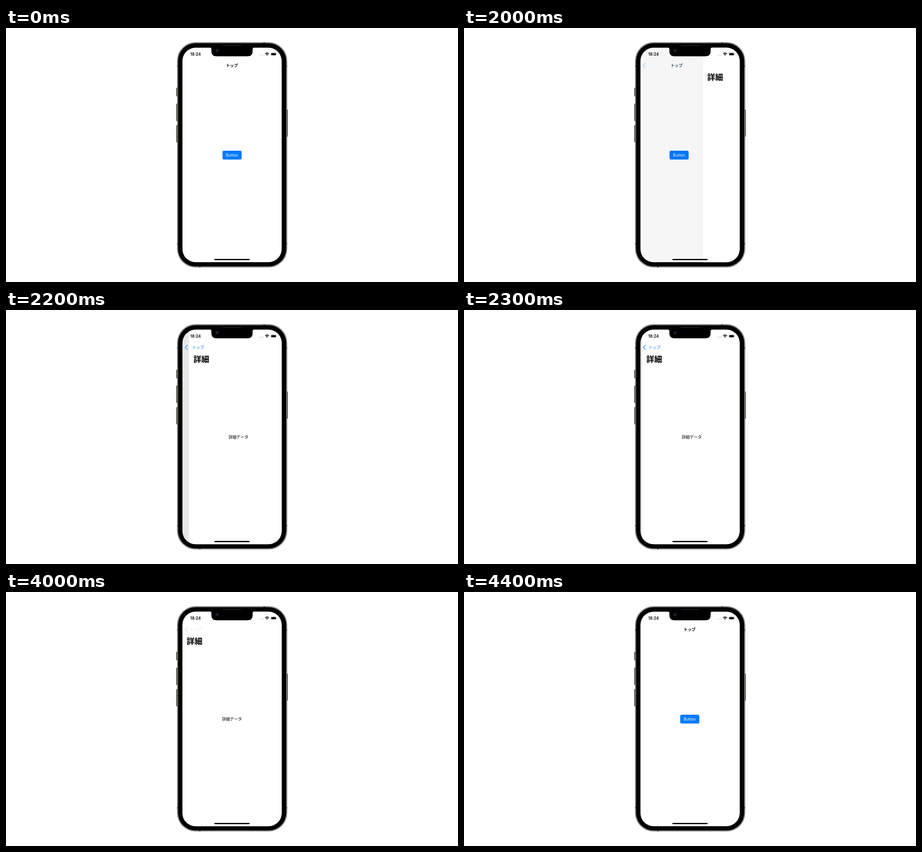
An HTML page for the animation above (5000 ms loop, 998 by 561 pixels).

```html
<!DOCTYPE html>
<html lang="ja">
<head>
<meta charset="utf-8">
<title>Push transition</title>
<style>
  html, body { margin: 0; width: 100%; height: 100%; overflow: hidden; background: #fff; }
  svg { display: block; width: 100vw; height: 100vh; }
  .jp { font-family: "Noto Sans CJK JP", "Noto Sans CJK", sans-serif; font-size: 8.8px; }
  .en { font-family: Inter, "Noto Sans", sans-serif; font-size: 8.8px; }
  .bold { font-weight: 700; }
  .semi { font-weight: 600; }
</style>
</head>
<body>
<svg viewBox="0 0 998 561">
  <defs>
    <clipPath id="screen"><rect x="389.6" y="43.5" width="219" height="473.8" rx="29"/></clipPath>
  </defs>

  <!-- side buttons -->
  <g fill="#45463f">
    <rect x="376" y="132" width="3" height="19" rx="1"/>
    <rect x="376" y="167" width="3" height="38.5" rx="1"/>
    <rect x="376" y="214.5" width="3" height="38" rx="1"/>
    <rect x="619.5" y="180" width="2.7" height="60" rx="1"/>
  </g>

  <!-- case and bezel -->
  <rect x="377.8" y="31.5" width="243" height="497.3" rx="41" fill="#55564f"/>
  <rect x="378.7" y="32.4" width="241.2" height="495.5" rx="40" fill="#c4c5bb"/>
  <rect x="379.5" y="33.2" width="239.6" height="493.9" rx="39.3" fill="#30312c"/>
  <rect x="380.2" y="33.9" width="238.2" height="492.5" rx="38.6"/>
  <g fill="#3c3d38">
    <rect x="377.8" y="82.5" width="2.4" height="3"/>
    <rect x="618.4" y="82.5" width="2.4" height="3"/>
    <rect x="377.8" y="475" width="2.4" height="3"/>
    <rect x="618.4" y="475" width="2.4" height="3"/>
    <rect x="568.5" y="31.5" width="3" height="2.4"/>
    <rect x="426.5" y="526.4" width="3" height="2.4"/>
  </g>

  <g clip-path="url(#screen)">
    <rect x="389" y="43" width="221" height="475" fill="#fff"/>
    <g id="topPage">
      <rect id="button" x="478" y="271" width="42.2" height="19.4" rx="3.4"/>
      <text id="buttonText" class="en" x="499.1" y="284" text-anchor="middle">Button</text>
    </g>
    <rect id="dim" x="389" y="43" width="221" height="475"/>
    <g id="detailPage">
      <rect x="389.6" y="43" width="221" height="475" fill="#fff"/>
      <text class="jp" x="499" y="284.3" text-anchor="middle">詳細データ</text>
    </g>
    <text id="largeTitle" class="jp bold" x="398.7" y="114.8" style="font-size:17.5px">詳細</text>
    <g id="back">
      <path id="chevron" d="M400.6 77.6 L395.6 82.6 L400.6 87.6" fill="none" stroke-width="1.3"
            stroke-linecap="round" stroke-linejoin="round"/>
      <text id="backText" class="jp" x="406" y="85.9">トップ</text>
    </g>
    <text id="topTitle" class="jp bold" x="485.8" y="85.9">トップ</text>

    <!-- status bar -->
    <text class="en semi" x="406.8" y="60.9">18:24</text>
    <g fill="#a5a5a5">
      <circle cx="560.3" cy="60" r=".7"/><circle cx="562.9" cy="60" r=".7"/>
      <circle cx="565.5" cy="60" r=".7"/><circle cx="568.1" cy="60" r=".7"/>
    </g>
    <g fill="none" stroke="#000" stroke-width="1.4">
      <path d="M572.2 56.8 A5.8 5.8 0 0 1 580.6 56.8"/>
      <path d="M573.8 58.5 A3.6 3.6 0 0 1 579 58.5"/>
    </g>
    <path d="M576.4 61.2 L574.9 59.7 A2.2 2.2 0 0 1 577.9 59.7 Z"/>
    <rect x="584.9" y="54.7" width="11.6" height="6" rx="1.7" fill="none" stroke="#999" stroke-width=".6"/>
    <rect x="585.6" y="55.4" width="10.2" height="4.6" rx="1"/>
    <rect x="597.1" y="56.7" width=".8" height="2" rx=".4" fill="#999"/>

    <rect x="460" y="509.9" width="78" height="2.8" rx="1.4"/>
  </g>

  <!-- notch, speaker and camera -->
  <path d="M450.5 43 Q453.5 43.5 453.5 46.5 V51 Q453.5 62.5 465 62.5 H533 Q544.5 62.5 544.5 51 V46.5 Q544.5 43.5 547.5 43 Z"/>
  <rect x="479" y="37.2" width="40" height="2.4" rx="1.2" fill="#1c1c1c"/>
  <circle cx="466.2" cy="50" r="4" fill="#10131a"/>
  <circle cx="466.2" cy="50" r="1.7" fill="#1d2940"/>
  <circle cx="466.6" cy="49.4" r=".6" fill="#46587c"/>
</svg>

<script>
  const LOOP = 5000, STEP = 100, WIDTH = 219, PARALLAX = 0.3;
  const BLUE = '#007aff';
  const $ = id => document.getElementById(id);
  const slide = (id, dx) => $(id).setAttribute('transform', `translate(${dx.toFixed(2)} 0)`);
  const set = (id, name, value) => $(id).setAttribute(name, value);

  // Critically damped spring: 1 at rest, falling to 0.
  const spring = x => (1 + x) * Math.exp(-x);

  // How far the detail page is out: 1 = off to the right, 0 = covering.
  function outAt(t) {
    if (t < 2000) return 1;
    if (t < 2500) return spring((t - 1918) * 0.0157);
    if (t < 4100) return 0;
    return 1 - spring((t - 4082) * 0.021);
  }

  function draw(time) {
    const t = Math.min(Math.floor(time % LOOP / STEP) * STEP, 4400);
    const out = outAt(t);
    const pressed = t >= 1500 && t < 2000;
    const backPressed = t >= 2500 && t < 4100;

    slide('topPage', -PARALLAX * WIDTH * (1 - out));
    slide('detailPage', WIDTH * out);
    set('dim', 'opacity', 0.1 * (1 - out));
    set('button', 'fill', pressed ? '#409bff' : BLUE);
    set('buttonText', 'fill', pressed ? '#cfe6ff' : '#fff');

    // The large title trails the page slightly in mid-slide.
    slide('largeTitle', WIDTH * out + Math.max(0, 340 * out * out * (0.63 - out)));
    slide('backText', 80 * out);
    slide('topTitle', -80 * (1 - out));
    set('topTitle', 'opacity', out);
    set('back', 'opacity', 1 - out);
    set('chevron', 'stroke', backPressed ? '#d2d2d2' : BLUE);
    set('backText', 'fill', backPressed ? '#e4e4e4' : BLUE);
  }

  function tick() {
    draw(performance.now());
    requestAnimationFrame(tick);
  }
  tick();
</script>
</body>
</html>
```
